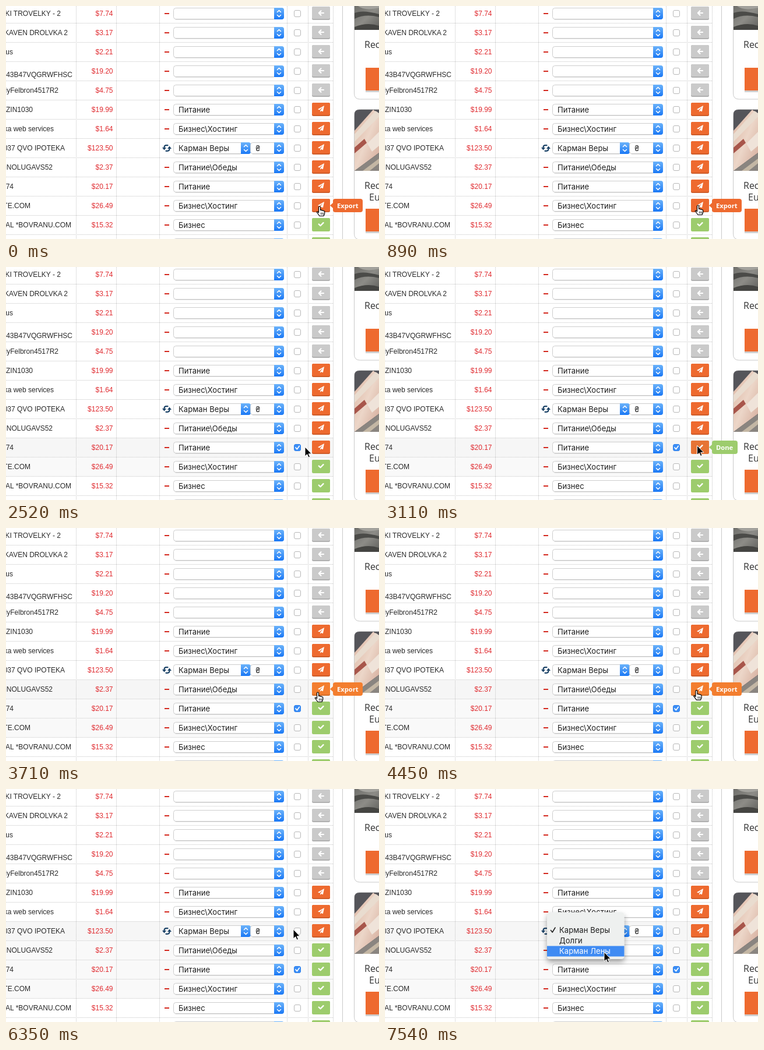
An HTML page for the animation above (8 s loop, 640x400 px).

```html
<!DOCTYPE html>
<html lang="ru">
<head>
<meta charset="utf-8">
<title>Export list</title>
<style>
html, body { margin: 0; width: 100%; height: 100%; overflow: hidden; background: #fff }
svg { display: block; width: 100%; height: 100% }
.cell { font: 12px "Liberation Sans", Arial, sans-serif; fill: #2a2a2a; text-anchor: end }
.price { fill: #e02b30 }
.menu { font: 13px Inter, sans-serif; letter-spacing: .08px; fill: #1c1c1c }
.tip { font: 700 11.2px "Open Sans", sans-serif; fill: #fff }
.card { font: 16px "Open Sans", sans-serif; fill: #333 }
.line { fill: none; stroke-linecap: round; stroke-linejoin: round }
</style>
</head>
<body>
<svg id="stage" viewBox="0 0 640 400" preserveAspectRatio="none">
  <defs>
    <linearGradient id="blue" x2="0" y2="1">
      <stop stop-color="#6cb3fa"/><stop offset="1" stop-color="#1a78f5"/>
    </linearGradient>
    <linearGradient id="stone" x2="1" y2="1">
      <stop stop-color="#6f6f6b"/><stop offset=".5" stop-color="#8d8c87"/><stop offset="1" stop-color="#5f5f5b"/>
    </linearGradient>
    <linearGradient id="note" x2="1" y2="1">
      <stop stop-color="#dcb3a0"/><stop offset=".5" stop-color="#ecd6c8"/><stop offset="1" stop-color="#d2a796"/>
    </linearGradient>
    <filter id="shadow" x="-20%" y="-20%" width="140%" height="160%">
      <feDropShadow dx="0" dy="5" stdDeviation="5" flood-opacity=".35"/>
    </filter>
    <clipPath id="photo1"><path d="M598 0H640V41H598Z"/></clipPath>
    <clipPath id="photo2"><path d="M598 283V186q0-8 8-8H640V283Z"/></clipPath>
  </defs>
  <g id="table"></g>
  <g id="cards"></g>
  <g id="overlay"></g>
</svg>
<script>
const ORANGE = [238, 106, 47], HOVER = [243, 126, 47], GREEN = [157, 204, 109];
const STEP = 148.1, LOOP = 8000;
const FOOD = 'Питание', HOSTING = 'Бизнес\\Хостинг';
const POCKETS = ['Карман Веры', 'Долги', 'Карман Лены'];

// label, price, category, button kind
const rows = [
  ['KI TROVELKY - 2', '$7.74', '', 'back'],
  ['KAVEN DROLVKA 2', '$3.17', '', 'back'],
  ['us', '$2.21', '', 'back'],
  ['43B47VQGRWFHSC', '$19.20', '', 'back'],
  ['miyFelbron4517R2', '$4.75', '', 'back'],
  ['ZIN1030', '$19.99', FOOD, 'send'],
  ['ka web services', '$1.64', HOSTING, 'send'],
  ['037 QVO IPOTEKA', '$123.50', POCKETS[0], 'send'],
  ['NOLUGAVS52', '$2.37', FOOD + '\\Обеды', 'send'],
  ['74', '$20.17', FOOD, 'send'],
  ['TE.COM', '$26.49', HOSTING, 'send'],
  ['AL *BOVRANU.COM', '$15.32', 'Бизнес', 'done'],
  ['', '', '', 'done']
];
const labelEnds = [94, 106, 12, 114, 90, 46, 82, 101, 80, 13, 42, 112, 0];
const doneAt = { 8: 34, 9: 21, 10: 7 };
const visitedAt = { 8: 37, 9: 24, 10: 11 };
// start step, end step, row, text, color
const tips = [
  [0, 7, 10, 'Export', ORANGE], [7, 10, 10, 'Done', GREEN],
  [19, 21, 9, 'Export', HOVER], [21, 24, 9, 'Done', GREEN],
  [24, 34, 8, 'Export', HOVER], [34, 37, 8, 'Done', GREEN]
];
const path = [
  [0, 538, 344], [5, 537, 343], [7, 537, 341], [9, 537, 339], [10, 532, 333], [11, 526, 322],
  [13, 503, 311], [15, 501, 310], [16, 505, 310], [17, 513, 309], [18, 523, 307], [19, 535, 307],
  [23, 536, 306], [24, 537, 291], [25, 535, 282], [27, 534, 280], [34, 535, 277], [36, 535, 277],
  [37, 531, 271], [40, 511, 252], [43, 493, 241], [44, 490, 240], [45, 490, 240], [46, 465, 243],
  [47, 408, 245], [48, 385, 246], [49, 374, 256], [50, 375, 270], [51, 376, 280]
];

const rowY = i => 13 + 33 * i;
const rgb = c => `rgb(${c.map(Math.round)})`;
const mix = (a, b, k) => a.map((v, i) => v + (b[i] - v) * k);
const rect = (x, y, w, h, fill, extra = '') =>
  `<rect x="${x}" y="${y}" width="${w}" height="${h}" fill="${fill}" ${extra}/>`;
const text = (cls, x, y, s, extra = '') => `<text class="${cls}" x="${x}" y="${y}" ${extra}>${s}</text>`;
const line = (d, color, width, extra = '') =>
  `<path class="line" d="${d}" stroke="${color}" stroke-width="${width}" ${extra}/>`;
const dotted = d => line(d, '#c4c4c4', 1, 'stroke-dasharray="1 1" style="stroke-linecap:butt"');
const shape = (d, fill, extra = '') => `<path d="${d}" fill="${fill}" ${extra}/>`;

function cursorAt(step) {
  const next = path.findIndex(p => p[0] > step);
  if (next < 0) return path.at(-1).slice(1);
  const [s0, x0, y0] = path[next - 1], [s1, x1, y1] = path[next];
  return mix([x0, y0], [x1, y1], (step - s0) / (s1 - s0));
}

function hoverRowAt(step, y) {
  if (step < 11) return -1;
  return step >= 46 ? 7 : Math.floor((y + 4) / 33);
}

function select(x, y, width, label) {
  const right = x + width, mid = right - 8.5;
  return rect(x + .5, y - 9.5, width - 1, 19, '#fff', 'rx="4" stroke="#cdcdcd"') +
    line(`M${x + 4} ${y + 10}H${right - 18}`, '#b5b5b5', .7) +
    shape(`M${right - 17} ${y - 10}h13q4 0 4 4v12q0 4-4 4h-13z`, 'url(#blue)') +
    line(`M${mid - 3} ${y - 2.5}l3-3 3 3M${mid - 3} ${y + 2.5}l3 3 3-3`, '#fff', 1.5) +
    text('menu', x + 9, y + 4.5, label);
}

function checkbox(y, checked) {
  const box = rect(494.5, y - 5.5, 11, 11, checked ? '#3b8ef6' : '#fff',
    `rx="2.5" stroke="${checked ? '#2f80ea' : '#b8b8b8'}"`);
  return box + (checked ? line(`M497 ${y}l2.3 2.8 4-5.5`, '#fff', 1.7) : '');
}

const icons = {
  back: line('M545 0H537M540.5-3.7L536.8 0l3.7 3.7', '#fff', 2.2),
  send: shape('M546-6L535 .2 537.8 1.4 544-3.8 539.2 2.2V5L540.9 3 543.9 4.3Z', '#fff'),
  done: line('M536.7-.5l2.8 2.8 5-5.2', '#fff', 2.3)
};

function button(y, kind, color) {
  const edge = kind === 'done' ? color : mix(color, [0, 0, 0], .13);
  return rect(525, y - 12, 31, 23, rgb(edge), 'rx="2.5"') +
    rect(525, y - 12, 31, 21, rgb(color), 'rx="2.5"') +
    `<g transform="translate(0 ${y - 1})">${icons[kind]}</g>`;
}

function refreshIcon(y) {
  const color = '#1d4468';
  const half = turn => `<g transform="rotate(${turn})">` +
    line('M1.5-4.8H-1Q-4.5-4.8-4.5-1', color, 2.2) + shape('M-8-1H-1L-4.5 3.6Z', color) + '</g>';
  return `<g transform="translate(276 ${y})">${half(0)}${half(180)}</g>`;
}

function buttonState(i, step) {
  const kind = rows[i][3];
  if (kind === 'back') return [kind, [202, 202, 202]];
  if (kind === 'done') return [kind, GREEN];
  if (step >= doneAt[i]) return ['done', mix(ORANGE, GREEN, Math.min(1, (step - doneAt[i] + .2) / 2))];
  const tip = tips.find(t => t[2] === i && step >= t[0] && step < t[1]);
  return [kind, tip ? tip[4] : ORANGE];
}

function drawTable(step, hoverRow) {
  let out = '';
  rows.forEach(([label, price, category], i) => {
    const y = rowY(i);
    if (i === hoverRow || step >= visitedAt[i])
      out += rect(0, y - 16, 562, 32, i === hoverRow ? '#f6f6f6' : '#f9f9f9');
    out += dotted(`M0 ${y + 16.5}H562`) +
      text('cell', labelEnds[i], y + (i === 3 ? 10 : 4), label) +
      text('cell price', 183.5, y + 4, price);
    if (i === 7) {
      out += refreshIcon(y) + select(287, y, 133, category) + select(419, y, 58, '₴');
    } else {
      out += rect(272, y - 1, 8, 2, '#d4291f') + select(287, y, 190, category);
    }
    out += checkbox(y, i === 9 && step >= 14) + button(y, ...buttonState(i, step));
  });
  for (const x of [120.5, 189.5, 263.5, 482.5, 518.5, 561.5]) out += dotted(`M${x} 0V400`);
  return out;
}

function drawTip([, , row, label, color]) {
  const y = rowY(row), fill = rgb(color);
  return rect(561, y - 12, label === 'Done' ? 44 : 51, 23, fill, 'rx="4"') +
    shape(`M556 ${y - .5}l5.5-5v10z`, fill) + text('tip', 568, y + 3.5, label);
}

function drawMenu(active) {
  return rect(278, 211.5, 132.5, 80.5, '#eef0ef', 'rx="5" filter="url(#shadow)"') +
    rect(278, 233.5 + 18 * active, 132.5, 18, '#3f8bf3') +
    POCKETS.map((s, i) => text('menu', 299, 247 + 18 * i, s, i === active ? 'style="fill:#fff"' : '')).join('') +
    line('M284.5 242.5l2.7 3.5 4.8-8', active ? '#222' : '#fff', 1.6);
}

function drawCursor([x, y], hand) {
  const body = hand
    ? shape('M-1.5 9.5V1.5a1.5 1.5 0 0 1 3 0V6.5q1.5-1 2.7.6 1.6-.7 2.5.7 2-.4 2 1.4v3.3L7 16.5H0L-4.8 10q.8-2 3.3.9z',
        '#fff', 'stroke="#000" stroke-width="1.2" stroke-linejoin="round"') +
      line('M2.5 11v3M4.6 11v3M6.6 11v3', '#000', .8)
    : shape('M0 0V16L3.7 12.6 6.1 18 8.5 17 6.2 11.8H11.3Z', '#000', 'stroke="#fff"');
  return `<g transform="translate(${x} ${y})">${body}</g>`;
}

function drawCards() {
  const action = y => rect(617, y + 3, 30, 39, '#cfcfcf') + rect(617, y, 30, 39, '#ee6a2f');
  const border = d => shape(d, '#fff', 'stroke="#c9c9c9"');
  return line('M577.5 0V400', '#c9c9c9', 1) +
    border('M642-2H597.5V150q0 10 10 10H642') +
    border('M642 177.5H607.5q-10 0-10 10V391q0 10 10 10H642') +
    `<g clip-path="url(#photo1)">${rect(598, 0, 42, 41, 'url(#stone)')}
      ${shape('M598 12Q612 6 640 14V19Q616 13 598 22Z', '#4b4b48')}
      ${shape('M604 0Q616 9 640 3V0Z', '#a3a29d')}
      ${shape('M598 36Q620 27 640 34V41H598Z', '#454542')}</g>` +
    `<g clip-path="url(#photo2)">${rect(598, 178, 42, 105, '#55555a')}
      ${shape('M598 214L630 178L640 186V252L598 283Z', 'url(#note)')}
      ${shape('M598 220L634 180L640 184V190L598 233Z', '#e9dccf')}
      ${shape('M598 243L615 228L619 235L598 253Z', '#a8564b')}
      ${shape('M620 236L640 216V240L628 250Z', '#efe3d9')}
      ${shape('M598 283L640 252V283Z', '#8a8580')}
      ${shape('M612 283L640 262V270L624 283Z', '#c4b7a4')}</g>` +
    text('card', 615, 72, 'Reco') + action(106) +
    text('card', 615, 314, 'Reco') + text('card', 623, 334, 'Eur') + action(348);
}

const layer = id => document.getElementById(id);
layer('cards').innerHTML = drawCards();

let shown = -1;
function frame(now) {
  const step = Math.min(53, Math.floor((now % LOOP + 20) / STEP));
  if (step !== shown) {
    shown = step;
    const pos = cursorAt(step);
    const tip = tips.find(t => step >= t[0] && step < t[1]);
    const active = step < 50 ? 0 : step < 51 ? 1 : 2;
    layer('table').innerHTML = drawTable(step, hoverRowAt(step, pos[1]));
    layer('overlay').innerHTML = (tip ? drawTip(tip) : '') +
      (step >= 48 ? drawMenu(active) : '') +
      drawCursor(pos, tip?.[3] === 'Export');
  }
  requestAnimationFrame(frame);
}
frame(0);
</script>
</body>
</html>
```
